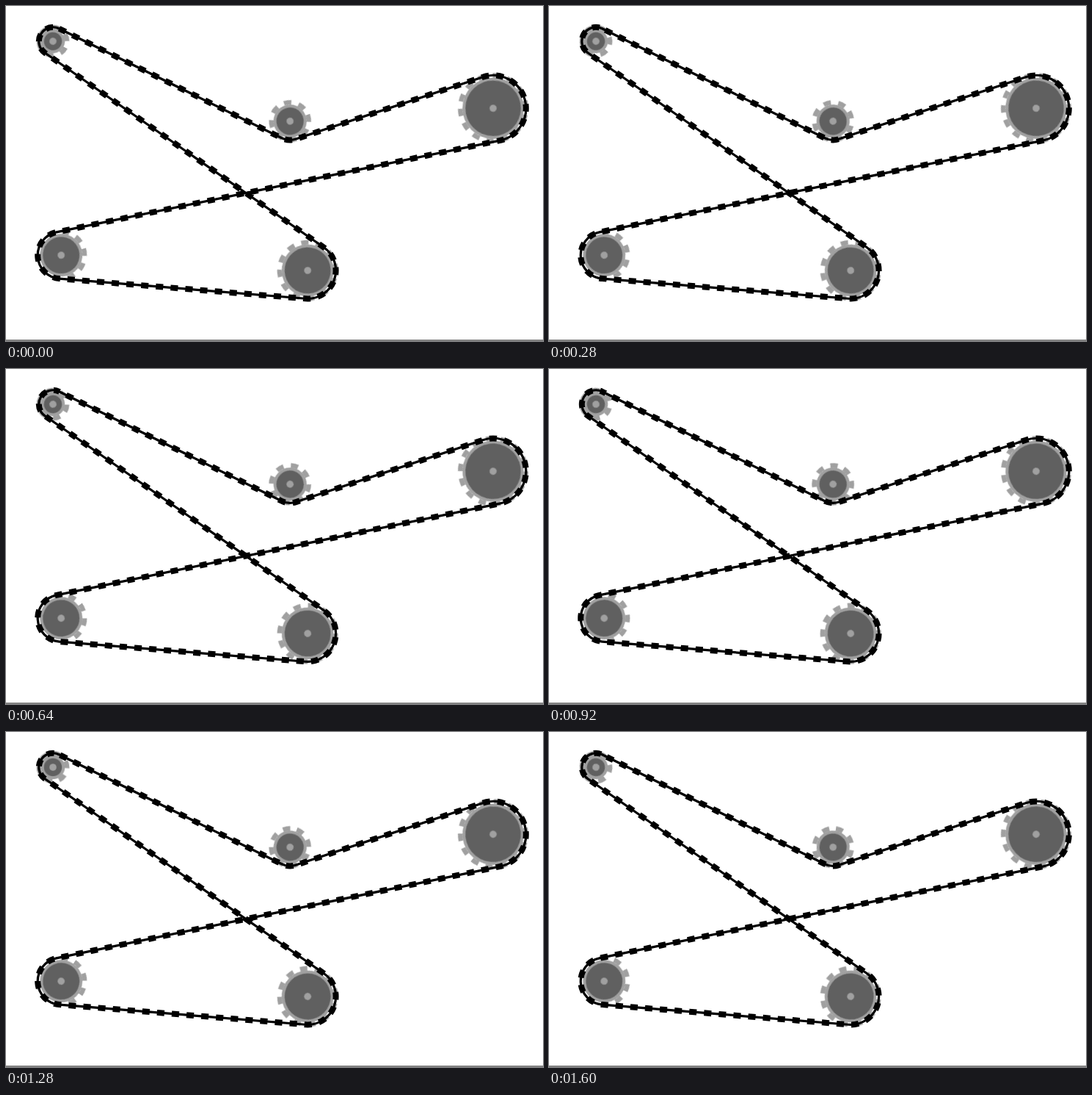
These frames come from a looping animation (732x456 px, 1.62 s). An HTML page:

```html
<!DOCTYPE html>
<html lang="en">
<head>
<meta charset="utf-8">
<title>Chain drive</title>
<style>
  html, body { margin: 0; width: 100%; height: 100%; overflow: hidden; background: #fff; }
  svg { display: block; width: 732px; height: 456px; }
  .gear { animation: turn 1620ms linear infinite; }
  .teeth { fill: none; stroke: #a0a0a0; stroke-width: 6.4; }
  .rim, .hub { fill: #a0a0a0; }
  .disc { fill: #606060; }
  .chain, .links { fill: none; stroke: #000; }
  .chain { stroke-width: 3.2; }
  .links { stroke-width: 8; animation: run 1620ms linear infinite; }
  @keyframes turn {
    from { transform: rotate(var(--from)); }
    to { transform: rotate(var(--to)); }
  }
  @keyframes run {
    from { stroke-dashoffset: var(--from); }
    to { stroke-dashoffset: var(--to); }
  }
</style>
</head>
<body>
<svg viewBox="0 0 732 456">
  <g id="gears"></g>
  <path class="chain"/>
  <path class="links"/>
  <rect y="454" width="732" height="2" fill="#848484"/>
</svg>
<script>
  const UNIT = 1.6;            // pixels per unit
  const TRAVEL = 1620 * 0.017; // chain movement per loop, px
  const TOOTH_START = 9.1;     // gear phase along the rim, px
  const LINK_START = -0.2;     // link phase along the chain, px

  // x, y, pitch radius (units), turning sense (1 = clockwise), in chain order
  const gears = [
    [40, 30, 12, 1],
    [242, 98, 16, -1],
    [415, 87, 28, 1],
    [47, 212, 20, -1],
    [257, 225, 24, -1]
  ].map(([x, y, r, s]) => ({ x: x * UNIT, y: y * UNIT, r: r * UNIT, s }));

  function add(parent, tag, attrs) {
    const el = document.createElementNS(parent.namespaceURI, tag);
    for (const key in attrs) el.setAttribute(key, attrs[key]);
    return parent.appendChild(el);
  }

  function setRange(el, from, to, unit) {
    el.style.setProperty('--from', from + unit);
    el.style.setProperty('--to', to + unit);
  }

  function drawGear({ x, y, r, s }) {
    const place = add(document.getElementById('gears'), 'g', { transform: `translate(${x} ${y})` });
    const g = add(place, 'g', { class: 'gear' });
    add(g, 'circle', { class: 'teeth', r, 'stroke-dasharray': 2 * Math.PI * UNIT });
    add(g, 'circle', { class: 'rim', r: r - 3 });
    add(g, 'circle', { class: 'disc', r: r - 7 });
    add(g, 'circle', { class: 'hub', r: 4.8 });
    setRange(g, s * TOOTH_START / r, s * (TOOTH_START + TRAVEL) / r, 'rad');
  }

  // Heading of the common tangent running from gear a to gear b
  function heading(a, b) {
    const dx = b.x - a.x, dy = b.y - a.y;
    const k = a.r * a.s - b.r * b.s;
    return Math.atan2(dy, dx) + Math.asin(k / Math.hypot(dx, dy));
  }

  function touch(g, angle) {
    const x = g.x + g.s * g.r * Math.sin(angle);
    const y = g.y - g.s * g.r * Math.cos(angle);
    return `${x} ${y}`;
  }

  function chainPath() {
    const n = gears.length, turn = 2 * Math.PI;
    const dirs = gears.map((g, i) => heading(g, gears[(i + 1) % n]));
    let d = 'M' + touch(gears[0], dirs[0]);
    for (let i = 1; i <= n; i++) {
      const g = gears[i % n], a = dirs[i - 1], b = dirs[i % n];
      const sweep = ((g.s * (b - a)) % turn + turn) % turn;
      d += `L${touch(g, a)}A${g.r} ${g.r} 0 ${+(sweep > Math.PI)} ${+(g.s > 0)} ${touch(g, b)}`;
    }
    return d + 'Z';
  }

  gears.forEach(drawGear);

  const chain = document.querySelector('.chain');
  const links = document.querySelector('.links');
  const path = chainPath();
  chain.setAttribute('d', path);
  links.setAttribute('d', path);

  const length = chain.getTotalLength();
  const count = Math.round(length / (4 * Math.PI * UNIT));
  links.setAttribute('stroke-dasharray', length / count / 2);
  setRange(links, -LINK_START, -LINK_START - TRAVEL, 'px');
</script>
</body>
</html>
```
